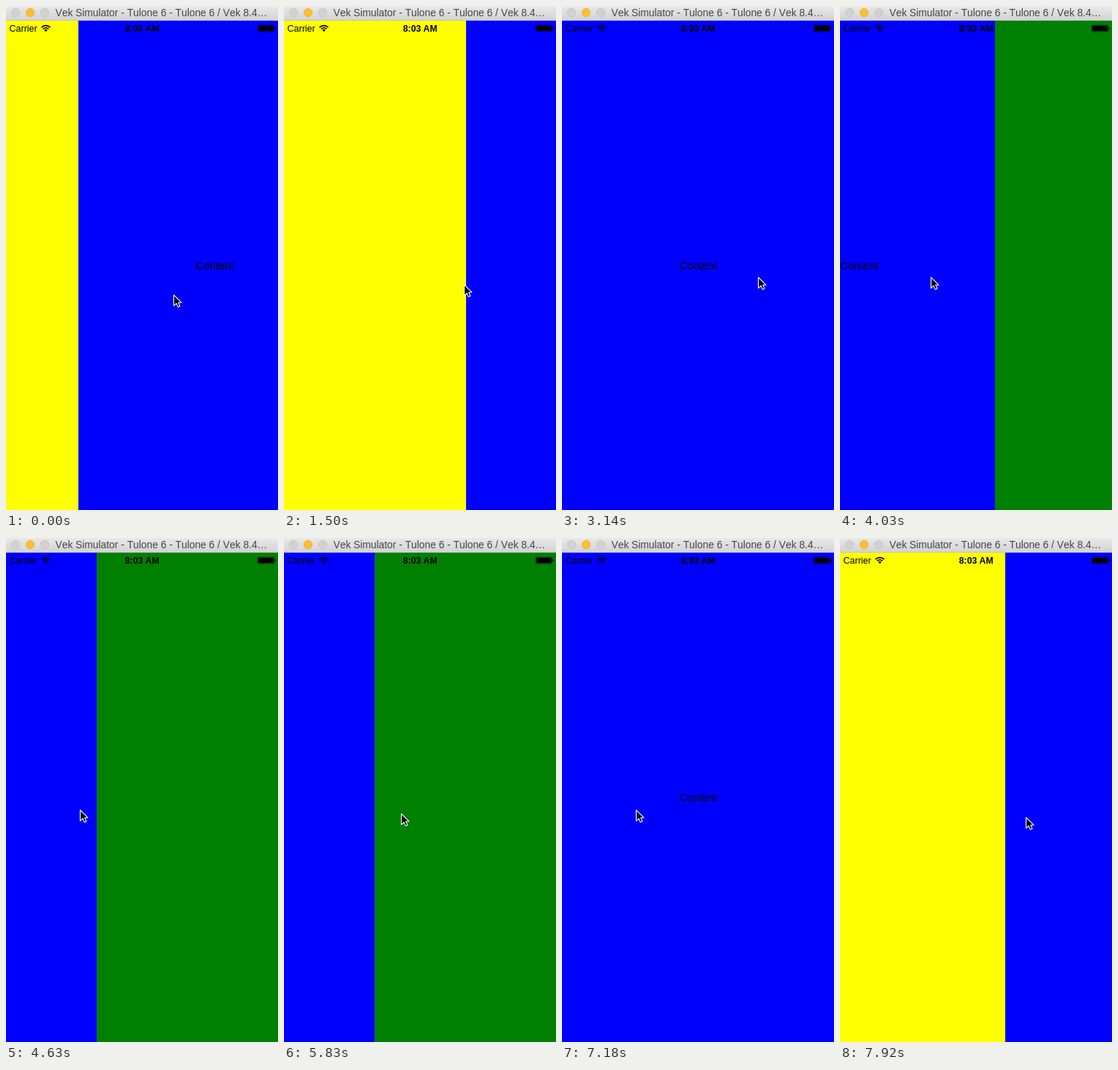
An HTML page that plays this animation: 372 by 687 pixels, repeating every 8 s.

```html
<!DOCTYPE html>
<html lang="en">
<head>
<meta charset="utf-8">
<title>Sliding panels</title>
<style>
  html, body { margin: 0; width: 100%; height: 100%; overflow: hidden; background: #ff0; }
  svg { display: block; }
  text { font-family: "Liberation Sans", Arial, sans-serif; font-kerning: none; }
</style>
</head>
<body>
<svg width="372" height="687" viewBox="0 0 372 687">
  <defs>
    <linearGradient id="bar" x1="0" y1="0" x2="0" y2="1">
      <stop offset="0" stop-color="#e9e9e9"/>
      <stop offset="1" stop-color="#d3d3d3"/>
    </linearGradient>
  </defs>

  <rect id="under" y="20" width="372" height="667" fill="#ff0"/>
  <g id="content">
    <rect y="20" width="372" height="667" fill="#00f"/>
    <text x="160.5" y="359" font-size="14.8">Content</text>
  </g>

  <g id="status">
    <text x="4.5" y="35" font-size="12.5">Carrier</text>
    <g fill="none" stroke="#000" stroke-width="1.8">
      <path d="M48.6 29.1A8.4 8.4 0 0 1 60.4 29.1"/>
      <path d="M50.8 31.3A5.3 5.3 0 0 1 58.2 31.3"/>
    </g>
    <path d="M52.4 32.9A3 3 0 0 1 56.6 32.9L54.5 35Z"/>
    <text x="162.8" y="35" font-size="12.2" font-weight="bold">8:03 AM</text>
    <rect x="344.3" y="26.2" width="22.6" height="8.7" rx="1.6" fill="none" stroke="#000" stroke-width=".6"/>
    <rect x="345.1" y="27" width="21" height="7.1" rx=".8"/>
    <path d="M367.7 29q1.5 .3 1.5 1.5t-1.5 1.5z"/>
  </g>

  <g id="titlebar">
    <rect width="372" height="19" fill="url(#bar)"/>
    <rect y="19" width="372" height="1" fill="#c4c4c4"/>
    <g fill="#d1d1d1" stroke="#bfbfbf" stroke-width=".7">
      <circle cx="13" cy="9" r="5.7"/>
      <circle cx="33" cy="9" r="5.7" fill="#fdbe30" stroke="#e6ab30"/>
      <circle cx="53" cy="9" r="5.7"/>
    </g>
    <text x="67.5" y="14" font-size="13.8" fill="#444">Vek Simulator - Tulone 6 - Tulone 6 / Vek 8.4…</text>
  </g>

  <g id="cursor">
    <path d="M.5 .8V15.6L4 12.3L6.2 17.4L8.9 16.3L6.7 11.3H11Z" stroke="#fff" stroke-width="1.1" stroke-linejoin="round"/>
  </g>
</svg>
<script>
const LOOP = 8000;
const REST = { panel: 99, tip: [229, 393] };

// Each gesture moves the panel, the pointer tip (through the points of path) or both,
// in a number of held steps; the powers set how strongly each slows down at the end.
const gestures = [
  { start: 150, end: 450, steps: 3, panel: 249, panelPower: 2 },
  { start: 750, end: 1200, steps: 4, path: [[259, 399]] },
  { start: 1500, end: 2250, steps: 6, path: [[233, 359], [89, 154], [290, 375]] },
  { start: 2700, end: 3140, steps: 4, panel: 0, path: [[268, 369]] },
  { start: 3580, end: 4480, steps: 7, panel: -248, panelPower: 1.22, path: [[82, 369]], tipPower: 1.755 },
  { start: 4630, end: 5230, steps: 5, path: [[175, 372]] },
  { start: 5530, end: 5830, steps: 3, path: [[160, 375]] },
  { start: 5980, end: 6130, steps: 2, path: [[82, 372]] },
  { start: 6280, end: 6430, steps: 2, panel: -46, panelPower: 2.6, path: [[150, 374]] },
  { start: 6580, end: 6880, steps: 3, panel: 0, panelPower: 2, path: [[78, 370]] },
  { start: 7180, end: 7330, steps: 1, path: [[101, 370]] },
  { start: 7330, end: 7920, steps: 5, panel: 226, path: [[254, 380]] }
];

const mix = (a, b, p) => a + (b - a) * p;
const easeOut = (p, power = 1) => 1 - (1 - p) ** power;

function progress({ start, end, steps }, t) {
  const done = 1 + Math.floor((t - start) / (end - start) * (steps - 1));
  return Math.min(1, done / steps);
}

function along(points, p) {
  const legs = points.length - 1;
  const i = Math.min(legs - 1, Math.floor(p * legs));
  return points[i].map((v, axis) => mix(v, points[i + 1][axis], p * legs - i));
}

function poseAt(t) {
  let { panel, tip } = REST;
  for (const g of gestures) {
    if (t < g.start) break;
    const p = progress(g, t);
    if ("panel" in g) panel = mix(panel, g.panel, easeOut(p, g.panelPower));
    if (g.path) tip = along([tip, ...g.path], easeOut(p, g.tipPower));
  }
  return { panel: Math.round(panel), tip: tip.map(Math.round) };
}

const byId = id => document.getElementById(id);
const under = byId("under"), content = byId("content"), cursor = byId("cursor");
const move = (el, x, y = 0) => el.setAttribute("transform", `translate(${x} ${y})`);

function draw(now) {
  const { panel, tip } = poseAt(now % LOOP);
  under.setAttribute("fill", panel < 0 ? "#008000" : "#ff0");
  move(content, panel);
  move(cursor, ...tip);
  requestAnimationFrame(draw);
}
draw(performance.now());
</script>
</body>
</html>
```
